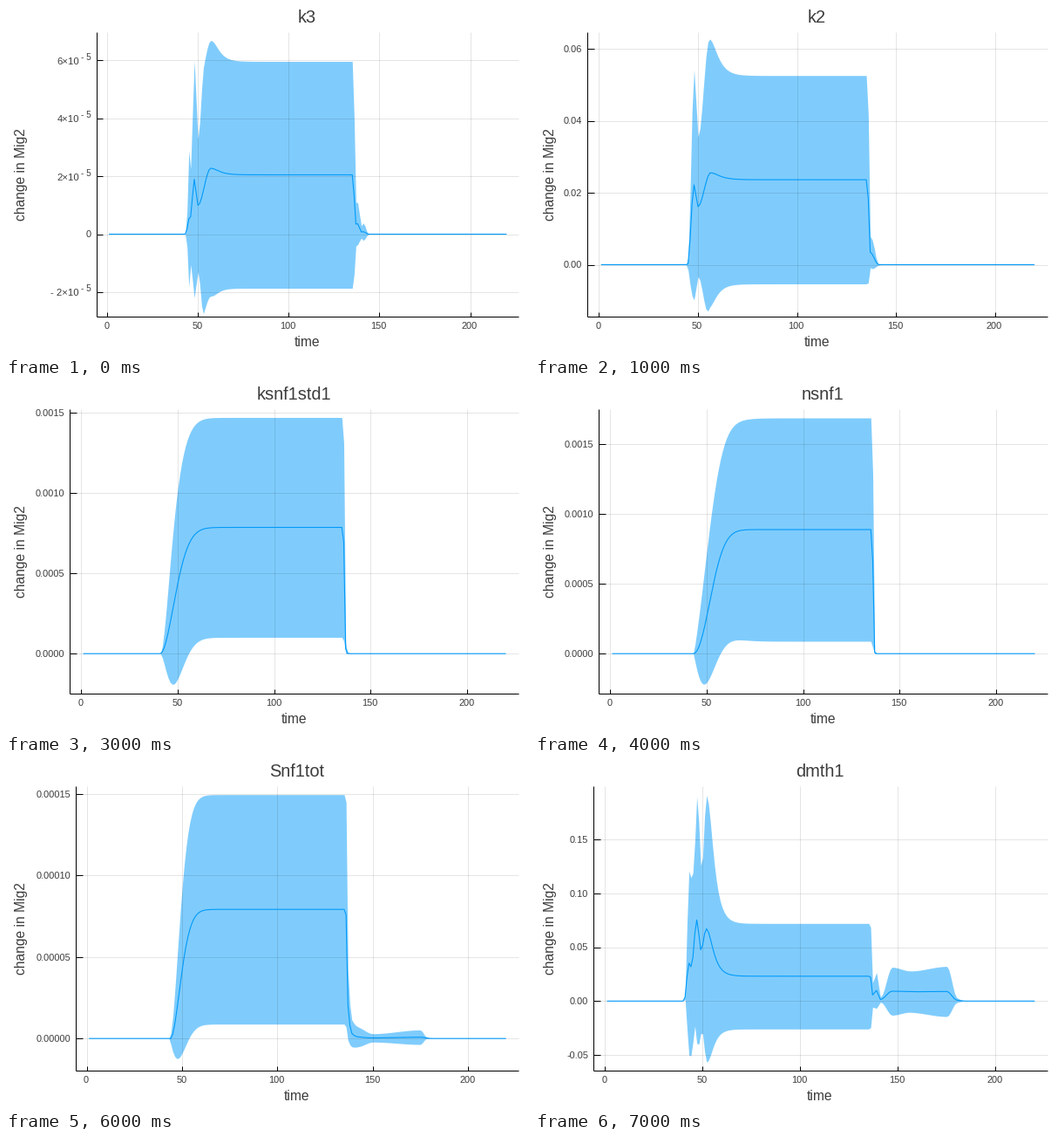
These frames come from a looping animation (600x400 px, 8 s). A matplotlib script:

```python
import numpy as np
import matplotlib.pyplot as plt
from matplotlib.animation import FuncAnimation

W, H, DPI = 600, 400, 100
TOP, BOTTOM, RIGHT = 30, 356, 588
BLUE, INK = "#009AFA", "#3c3c3c"
PX = 72 / DPI
T = np.arange(1, 221)


def smooth(points):
    """Monotone cubic through (time, height) points, flat at each extreme."""
    x, y = np.array(points, float).T
    h = np.diff(x)
    d = np.diff(y) / h
    same = d[:-1] * d[1:] > 0
    total = np.where(same, d[:-1] + d[1:], 1)
    m = np.zeros(len(x))
    m[1:-1] = np.where(same, 2 * d[:-1] * d[1:] / total, 0)
    i = np.clip(np.searchsorted(x, T, "right") - 1, 0, len(h) - 1)
    s = (T - x[i]) / h[i]
    bend = s * (1 - s) * ((1 - s) * m[i] - s * m[i + 1])
    return y[i] + (y[i + 1] - y[i]) * s * s * (3 - 2 * s) + h[i] * bend


def rise(level, start, scale, power):
    """S-shaped growth to a plateau."""
    return level * (1 - np.exp(-(np.clip(T - start, 0, None) / scale) ** power))


def peaks(level, tau, start, *tops):
    """Swing through the turning points, then settle from the last one."""
    end, last = tops[-1]
    swing = smooth([(1, 0), (start, 0), *tops])
    settle = level + (last - level) / np.cosh((T - end) / tau)
    return np.where(T < end, swing, settle)


def fall(body, drop, *tail):
    """Switch off after 135, with the rest of the decay given as points."""
    level = body[T == 135][0]
    after = smooth([(135, level), (136, level * drop), *tail, (220, 0)])
    return np.where(T < 135, body, after)


# Each pair is mean and spread, in px above the zero line.
K3 = (
    fall(peaks(68, 3.9, 43.3, (45, 17.5), (46, 20), (48, 63), (50, 33),
               (57, 75.5)),
         0.66, (137, 11.5), (138, 12), (140, 2.5), (141, 2.8), (144, 0)),
    fall(peaks(130, 3.4, 43.5, (45, 78), (46, 55), (48, 136), (50, 76),
               (53, 141), (57.2, 146.5)),
         0.7, (137, 25), (138, 24), (140, 7), (141, 10), (144, 0)),
)
K2 = (
    fall(peaks(97.4, 3.9, 44.8, (48, 91.5), (50, 66.5), (56.3, 105.3)),
         0.78, (137, 14.5), (138, 12), (141, 0.3), (143, 0)),
    fall(peaks(119.4, 3.55, 44.5, (48, 132), (50, 80), (55.2, 154.5)),
         0.81, (137, 18), (138, 16.5), (141, 1), (143, 0)),
)
KSNF = (
    fall(rise(144.7, 41, 10.1, 1.85), 0.885, (137, 6), (138, 0.5), (140, 0)),
    fall(rise(126, 41, 5.9, 1.65), 0.9, (137, 6), (138, 0.5), (140, 0)),
)
NSNF = (
    fall(rise(142.2, 43, 11.47, 2.1), 0.75, (137, 1.5), (138, 0)),
    fall(rise(128, 43, 7.73, 1.18), 0.78, (137, 1.5), (138, 0)),
)
SNF1TOT = (
    fall(rise(148, 44, 7, 1.75), 0.96,
         (137, 38), (139, 6), (142, 2), (150, 0.7), (175, 1.5), (181, 0)),
    fall(rise(131.5, 43, 5.98, 1.65), 0.98,
         (137, 40), (139, 15.5), (144, 10), (150, 4.8), (175, 8.3),
         (178, 1.2), (181, 0)),
)
DMTH1 = (
    fall(peaks(28.5, 3, 40.5, (43, 43.5), (44.2, 39), (47, 93), (49.2, 58),
               (51.8, 83)),
         0.95, (137, 7), (139, 12.2), (141, 1.8), (147, 11.3), (160, 10.7),
         (175, 11), (180, 1.2), (185, 0)),
    fall(peaks(60.5, 2.9, 40.8, (43, 105.5), (45.5, 96), (47.2, 143),
               (49.4, 92), (51.9, 153)),
         0.95, (137, 14), (139, 20.5), (141, 3), (147, 27.5), (156, 23.7),
         (175, 28.7), (180, 3), (185, 0)),
)

# title, axis x, zero y, px per tick, tick value, decimals, ticks, curves
SCENES = [
    ("k3", 104.4, 261.5, 66.4, 2, None, range(-1, 4), K3),
    ("k2", 60.8, 296.5, 82.5, 0.02, 2, range(4), K2),
    ("ksnf1", 54.1, 310.2, 78, 0.1, 1, range(4), KSNF),
    ("ksnf1std1", 74, 310.2, 92, 0.0005, 4, range(4), KSNF),
    ("nsnf1", 74, 310.2, 80, 0.0005, 4, range(4), NSNF),
    ("nsnf2", 60.8, 310.2, 52, 0.05, 2, range(6), NSNF),
    ("Snf1tot", 80.8, 319.2, 93.4, 0.00005, 5, range(4), SNF1TOT),
    ("dmth1", 67.8, 276.3, 61.8, 0.05, 2, range(-1, 4), DMTH1),
]

fig = plt.figure(figsize=(W / DPI, H / DPI), dpi=DPI, facecolor="white")
ax = fig.add_axes([0, 0, 1, 1])


def text(x, y, s, size, ha="center", **kw):
    ax.text(x, y, s, fontsize=size * PX, ha=ha, va="baseline",
            family="Liberation Sans", color=INK, **kw)


def line(x, y, color="black", width=1, **kw):
    ax.plot(x, y, color=color, lw=width * PX, solid_capstyle="butt", **kw)


def y_label(right, y, k, step, decimals):
    if decimals is not None:
        text(right, y + 3.8, f"{k * step:.{decimals}f}", 11, "right")
    elif k == 0:
        text(right, y + 3.8, "0", 11, "right")
    else:
        sign = "- " if k < 0 else ""
        text(right - 14, y + 4.5, f"{sign}{abs(k * step)}×10", 11.2, "right")
        text(right, y - 0.5, "- 5", 10, "right")


def draw(n):
    title, left, zero, gap, step, decimals, ticks, (mean, spread) = SCENES[n]
    ax.clear()
    ax.set(xlim=(0, W), ylim=(H, 0))
    ax.axis("off")

    scale = (RIGHT - left) / 232.14
    to_x = lambda t: left + (t + 5.57) * scale
    edge = left - 0.7
    x_ticks = [(t, to_x(t)) for t in range(0, 201, 50)]
    y_ticks = [(k, zero - k * gap) for k in ticks]

    for _, x in x_ticks:
        line([x, x], [TOP, BOTTOM], alpha=0.1)
    for _, y in y_ticks:
        line([edge, RIGHT], [y, y], alpha=0.1)

    line([edge, edge], [TOP, BOTTOM])
    line([edge, RIGHT], [BOTTOM, BOTTOM])
    for t, x in x_ticks:
        line([x, x], [BOTTOM, BOTTOM - 4.9])
        text(x - 0.8, 370, str(t), 11)
    for k, y in y_ticks:
        line([edge, edge + 0.015 * (RIGHT - left)], [y, y])
        y_label(left - 6.5, y, k, step, decimals)

    xs, ys = to_x(T), zero - mean
    ax.fill_between(xs, ys - spread, ys + spread, color=BLUE, alpha=0.5, lw=0)
    line(xs, ys, BLUE, 1.1)

    middle = (left + RIGHT) / 2 - 1
    text(middle, 19.2, title, 20)
    text(middle, 389.6, "time", 15.6)
    text(22.4, 192.6, "change in Mig2", 15.6, rotation=90,
         rotation_mode="anchor")
    return []


anim = FuncAnimation(fig, draw, frames=len(SCENES), init_func=lambda: [],
                     interval=1000, repeat=True)
plt.show()
```
